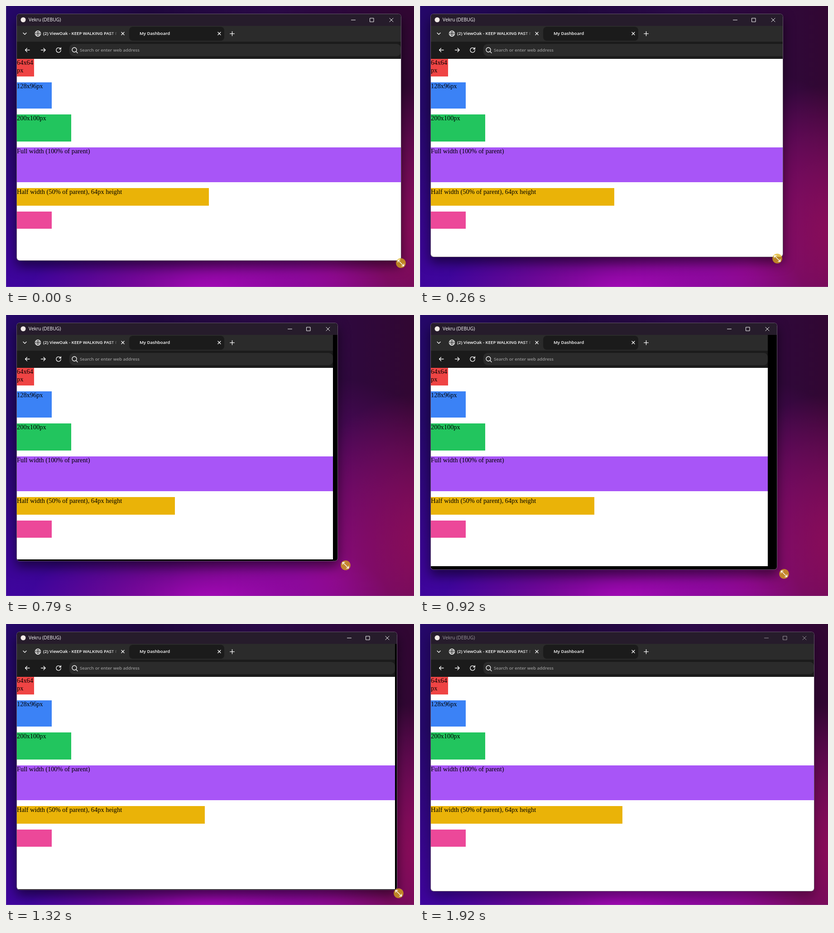
Animation, 901 px wide and 622 px high, one loop 1.98 s. Source, as an HTML page:

```html
<!DOCTYPE html>
<html lang="en">
<head>
<meta charset="utf-8">
<title>Window resize</title>
<style>
  html, body { margin: 0; width: 100%; height: 100%; overflow: hidden; }
  body {
    position: relative;
    font: 600 9.6px/14px "Open Sans", "Noto Sans", sans-serif;
    color: #fff;
    background:
      radial-gradient(ellipse 400px 170px at 450px 640px, #ac08be, #a008b200),
      radial-gradient(ellipse 300px 330px at 930px 500px, #8c0d58, #8c0d5800),
      radial-gradient(ellipse 360px 420px at 720px 560px, #86098f, #86098f00),
      radial-gradient(ellipse 420px 430px at 40px 660px, #4204a4, #4204a400),
      linear-gradient(90deg, #25086a, #20083f 35%, #2c0a4a 65%, #310732);
  }
  body::after {
    content: ""; position: absolute; inset: 0;
    border: solid #9d8fb866; border-width: 0 0 1px 1px;
  }
  .win, .stage, .stage * { position: absolute; white-space: nowrap; }
  .win {
    left: 24px; top: 18px;
    width: calc(var(--right) * 1px - 24px);
    height: calc(var(--bottom) * 1px - 18px);
    border-radius: 6px;
    box-shadow: 0 0 0 1px #65566a, 0 12px 24px 2px rgba(0, 0, 0, var(--shade));
  }
  .clip { position: absolute; inset: 0; overflow: hidden; border-radius: 6px; background: #000; }
  .stage { left: -24px; top: -18px; width: 901px; height: 622px; }
  .title { left: 24px; top: 18px; width: 900px; height: 26px; background: #261c2b; }
  .name { left: 50px; top: 23px; font-weight: 400; font-size: 10.3px; }
  .dim { opacity: var(--focus); }
  .strip, .tools, .page { left: 24px; width: calc(var(--inner) * 1px - 24px); }
  .strip { top: 44px; height: 35px; background: #2b2b2b; }
  .tools { top: 79px; height: 38px; background: #1b1b1b; }
  .page { top: 117px; height: calc(var(--floor) * 1px - 117px); background: #fff; }
  .tab { left: 272px; top: 46px; width: 210px; height: 31px; border-radius: 8px; background: #1b1b1b; }
  .field {
    left: 140px; top: 84px; height: 27px; border-radius: 9px; background: #2b2b2b;
    width: calc(var(--inner) * 1px - 140.5px);
  }
  .long {
    left: 82px; top: 54px; width: 163px; overflow: hidden;
    -webkit-mask-image: linear-gradient(90deg, #000 148px, transparent 166px);
    mask-image: linear-gradient(90deg, #000 148px, transparent 166px);
  }
  .short { left: 295px; top: 54px; }
  .hint { left: 163px; top: 91px; color: #969696; }
  .box {
    left: 24px; color: #000;
    font: 14.4px/16.6px "Liberation Serif", "Times New Roman", serif;
  }
  svg { overflow: visible; fill: none; stroke: #fff; stroke-width: 1.3; stroke-linecap: round; stroke-linejoin: round; }
  .controls { left: calc(var(--right) * 1px); top: 30.5px; width: 1px; height: 1px; stroke-width: 1; }
  .cursor {
    position: absolute; left: 0; top: 0; width: 1px; height: 1px;
    transform: translate(calc(var(--cx) * 1px), calc(var(--cy) * 1px));
    visibility: var(--shown);
  }
</style>
</head>
<body>
<div class="win"><div class="clip"><div class="stage">
  <div class="title"></div>
  <div class="name dim">Vekru (DEBUG)</div>
  <div class="strip"></div>
  <div class="tab"></div>
  <div class="tools"></div>
  <div class="field"></div>
  <div class="page"></div>
  <div class="long">(2) ViewOak - KEEP WALKING PAST IT</div>
  <div class="short">My Dashboard</div>
  <div class="hint">Search or enter web address</div>

  <div class="box" style="top:117px;width:38.4px;height:38.5px;background:#ef4444">64x64<br>px</div>
  <div class="box" style="top:169px;width:76.8px;height:57.5px;background:#3b82f6">128x96px</div>
  <div class="box" style="top:240px;width:120px;height:60px;background:#22c55e">200x100px</div>
  <div class="box" style="top:313.3px;width:calc(var(--inner) * 1px - 24px);height:76.8px;background:#a855f7">Full width (100% of parent)</div>
  <div class="box" style="top:403.4px;width:calc((var(--parent) - 24) * .5px);height:38.4px;background:#eab308">Half width (50% of parent), 64px height</div>
  <div class="box" style="top:455px;width:76.8px;height:38.4px;background:#ec4899"></div>

  <svg width="901" height="622">
    <circle cx="38" cy="30.5" r="5.5" fill="#f1e9e6" stroke="none"/>
    <path d="M38 59.5l3.5 3.5 3.5-3.5"/>
    <g stroke-width="1.1">
      <circle cx="70.5" cy="61" r="6"/>
      <ellipse cx="70.5" cy="61" rx="2.7" ry="6"/>
      <path d="M65 59h11M65 63h11"/>
    </g>
    <path d="M255 58l6 6m0-6l-6 6M468 58l6 6m0-6l-6 6M499.5 56.5v9.5m-4.8-4.7h9.6"/>
    <path d="M52 97.5h-9.5m4-4l-4 4 4 4M77.500 97.500h9.500m-4-4l4 4-4 4"/>
    <path d="M120.200 94.500a5.200 5.200 0 1 0 1 3.500M121.300 92v3.500h-3.500"/>
    <path d="M155 101l3 3"/><circle cx="151" cy="97" r="5"/>
  </svg>
  <svg class="controls dim">
    <path d="M-109.500 0h9M-68 -4h8v8h-8zM-25 -4l8 8m0-8l-8 8"/>
  </svg>
</div></div></div>

<svg class="cursor">
  <circle r="10.800" fill="#dcb018" fill-opacity=".74" stroke="none"/>
  <path d="M-6 -6L6 6M-6.500 -2v-4.500h4.500M6.500 2v4.500h-4.500" stroke-width="1.400"/>
</svg>

<script>
  const LOOP = 1980, STEP = 66.25, END = 24;
  const NAMES = ["cx", "cy", "right", "bottom", "inner", "floor", "parent"];
  // step, pointer x/y, window right/bottom, laid-out right/bottom, half-bar parent right
  const KEYS = [
    [0, 872, 569, 872, 563, 872, 563, 872],
    [4, 789, 559, 801, 555, 816, 557, 833],
    [7, 737, 550, 744, 546, 757, 548, 770],
    [10, 720, 546, 719, 541, 725, 542, 732],
    [12, 750, 554, 732, 544, 722, 541, 722],
    [14, 804, 573, 788, 563, 768, 556, 746],
    [16, 844, 587, 838, 580, 823, 572, 790],
    [20, 867, 596, 863, 588, 859, 586.5, 854],
    [24, 874, 599, 870, 591, 870, 591, 869]
  ];
  const root = document.documentElement.style;
  const set = (name, value) => root.setProperty("--" + name, value);

  function slope(k, col) {
    const a = KEYS[Math.max(0, k - 1)];
    const b = KEYS[Math.min(KEYS.length - 1, k + 1)];
    return (b[col] - a[col]) / (b[0] - a[0]);
  }

  // cubic Hermite curve through the keys
  function curve(step, col) {
    let k = 0;
    while (k < KEYS.length - 2 && KEYS[k + 1][0] <= step) k++;
    const a = KEYS[k], b = KEYS[k + 1], span = b[0] - a[0];
    const u = (step - a[0]) / span, v = 1 - u;
    return a[col] * v * v * (1 + 2 * u) + b[col] * u * u * (3 - 2 * u)
      + span * u * v * (slope(k, col) * v - slope(k + 1, col) * u);
  }

  function draw(now) {
    const t = Math.floor((now % LOOP) / 10) * 10;
    const step = Math.floor((t + 9.9) / STEP);
    const at = Math.min(step, END);
    NAMES.forEach((name, i) => {
      const value = curve(at, i + 1);
      set(name, i < 4 ? Math.round(value) : Math.round(value * 2) / 2);
    });
    const blur = Math.max(0, Math.min(1, (step - 27) / 2));
    set("focus", 1 - 0.45 * blur);
    set("shade", 0.5 - 0.2 * blur);
    set("shown", blur ? "hidden" : "visible");
  }

  const start = performance.now();
  function tick() {
    draw(performance.now() - start);
    requestAnimationFrame(tick);
  }
  tick();
</script>
</body>
</html>
```
